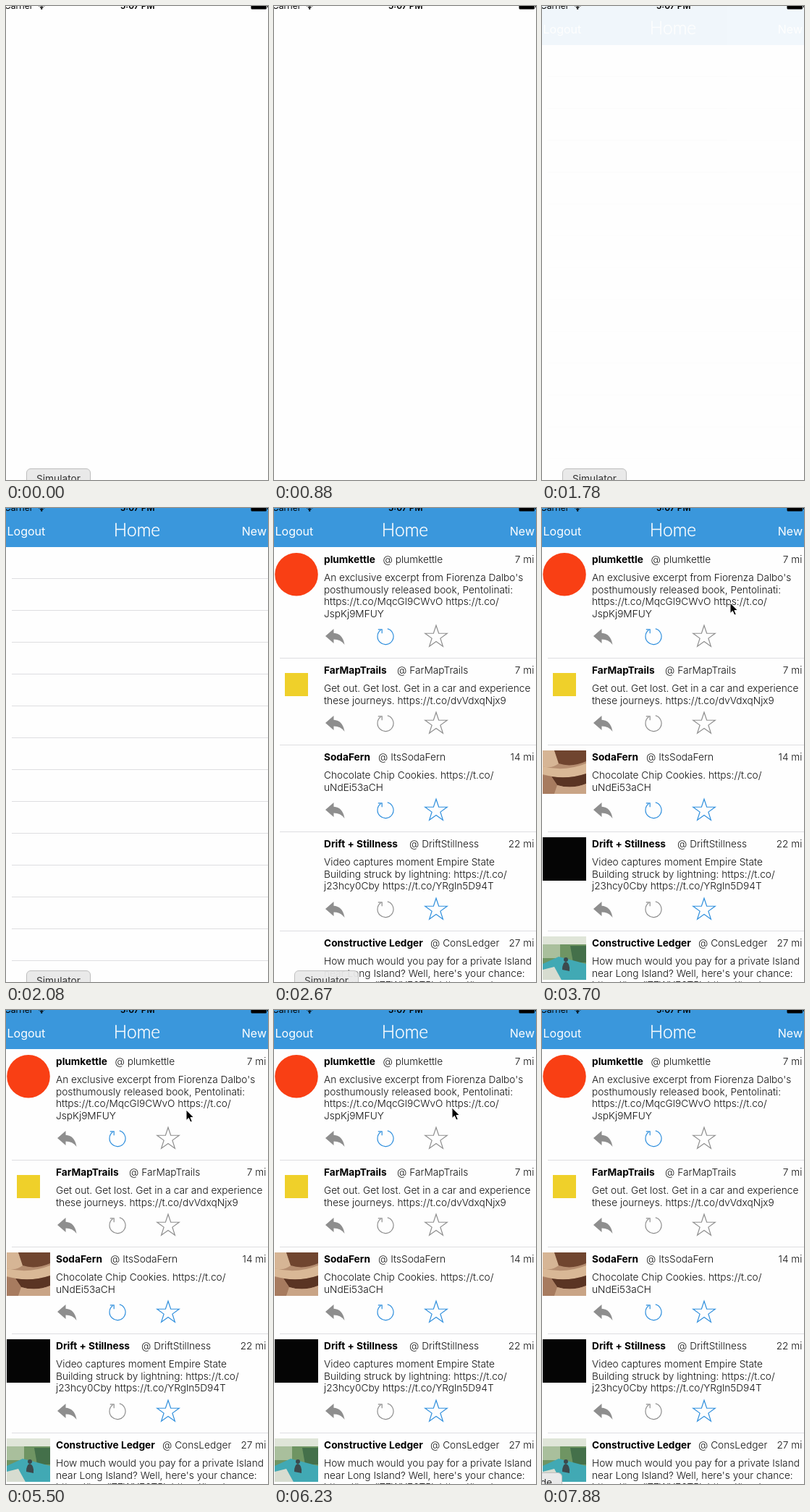
These frames come from a looping animation (362 px wide and 655 px high, 8000 ms). An HTML page:

```html
<!DOCTYPE html>
<html lang="en">
<head>
<meta charset="utf-8">
<title>Home feed</title>
<style>
html, body { margin: 0; width: 100%; height: 100%; overflow: hidden; background: #fefefe; }
#stage {
  position: relative; width: 362px; height: 655px; overflow: hidden; background: #fefefe;
  font: 300 13.7px/16.6px Inter, "Open Sans", sans-serif; color: #111; white-space: pre;
}
#stage div, #stage span, #stage b, #stage svg { position: absolute; }
#home, #feed { inset: 0; }
#home, #feed, .late, .tip, #cursor { animation: 8s step-end infinite; }

.nav { left: 0; top: 0; width: 362px; height: 54px; background: #3a97dc; color: #fff; }
.nav span { font-size: 16px; font-weight: 400; line-height: 20px; top: 22px; }
.nav .title {
  font: 300 24.5px/30px Lato, sans-serif; -webkit-text-stroke: .4px #fff;
  top: 15px; left: 0; width: 362px; text-align: center;
}
.line { left: 8px; right: 0; height: 1px; background: #dedee1; }

#feed { top: 54px !important; background: #fefefe; }
.row { left: 0; width: 362px; }
.row b, .row .at, .row .ago { top: 8.7px; }
.row b, .row .text { left: 69px; }
.row b { font-weight: 700; color: #000; }
.row .ago { right: 2.5px; }
.row .text { top: 34px; line-height: 16.55px; }
.row .pic { left: 1px; top: 8px; width: 60px; height: 59.5px; overflow: hidden; }
.row .icons { left: 60px; bottom: 10px; overflow: visible; }

.status { left: 0; top: 0; color: #000; font-size: 12px; font-weight: 400; }
.status span { top: -8.2px; }
.tip {
  top: 639px; height: 30px; padding: 0 13px; box-sizing: border-box; line-height: 26px;
  border: 1px solid #bdbdbd; border-radius: 6px; background: #e9e9e9; color: #333; font-weight: 400;
}
#sim { left: 28px; animation-name: sim; }
#code { right: 334px; animation-name: code; }
#cursor { left: -1px; top: -.5px; animation-name: point; }
#home { animation-name: home; }
#feed { animation-name: feed; }
.late { animation-name: late; }

@keyframes home { 0% { opacity: 0 } 22.25% { opacity: .07 } 24.125% { opacity: .55 } 26%, 100% { opacity: 1 } }
@keyframes feed { 0% { opacity: 0 } 33.375%, 100% { opacity: 1 } }
@keyframes late { 0% { opacity: 0 } 37.125%, 100% { opacity: 1 } }
@keyframes sim {
  0% { opacity: 1 } 3.625% { opacity: 0 } 16.625% { opacity: 1 }
  33.375% { opacity: .95 } 35.25%, 100% { opacity: 0 }
}
@keyframes code { 0% { opacity: 0 } 14.75% { opacity: 1 } 16.625% { opacity: 0 } 98.5%, 100% { opacity: 1 } }
@keyframes point {
  0% { transform: translate(70px, 670px) }
  1.75% { transform: translate(80px, 640px) }
  3.625% { transform: translate(100px, 560px) }
  5.5% { transform: translate(140px, 430px) }
  7.25% { transform: translate(185px, 270px) }
  9.125% { transform: translate(225px, 110px) }
  11% { transform: translate(240px, -40px) }
  35.25% { transform: translate(88px, 640px) }
  37.125% { transform: translate(110px, 585px) }
  38.875% { transform: translate(150px, 480px) }
  40.75% { transform: translate(195px, 350px) }
  42.625% { transform: translate(232px, 240px) }
  44.375% { transform: translate(255px, 165px) }
  46.25% { transform: translate(261px, 131px) }
  68.75% { transform: translate(250px, 138px) }
  70.625% { transform: translate(225px, 150px) }
  72.375% { transform: translate(197px, 156px) }
  74.25% { transform: translate(215px, 150px) }
  76% { transform: translate(236px, 141px) }
  77.875% { transform: translate(247px, 135px) }
  91% { transform: translate(207px, 160px) }
  92.875%, 100% { transform: translate(70px, 670px) }
}
</style>
</head>
<body>
<div id="stage">
  <div id="home">
    <div class="nav">
      <span style="left:1.5px">Logout</span>
      <span class="title">Home</span>
      <span style="right:2px">New</span>
    </div>
  </div>
  <div id="feed"></div>
  <div class="status">
    <span style="left:-2px">Carrier</span>
    <svg style="left:44px;top:0" width="11" height="6" fill="none" stroke="#000" stroke-width="1.5">
      <path d="M1 0Q5.2 -2.5 9.5 0M3 2Q5.2 .3 7.5 2"/><circle cx="5.2" cy="3.6" r=".5"/>
    </svg>
    <span style="left:158px;font-weight:600">5:07 PM</span>
    <svg style="left:338px;top:0" width="24" height="6">
      <rect x=".5" y="-6" width="21.5" height="10.5" rx="1.5" fill="#000"/>
      <rect x="23" y="-2" width="1.5" height="4"/>
    </svg>
  </div>
  <div class="tip" id="sim">Simulator</div>
  <div class="tip" id="code">Decode</div>
  <svg id="cursor" width="14" height="20" overflow="visible">
    <path d="M0 0V14.5L3.4 11.4L5.8 17L8.3 16L5.9 10.5H10.5Z" fill="#000" stroke="#fff"/>
  </svg>
</div>
<script>
const GRAY = '#8e8e8e', BLUE = '#2f8fdd';

const pics = {
  disc: '<circle cx="30" cy="29.8" r="29.8" fill="#f93f14"/>',
  square: '<rect x="14" y="13" width="32" height="32" fill="#efd02a"/>',
  cake: `<rect width="60" height="60" fill="#b58d70"/>
    <path d="M0 0H16L22 18Q12 26 0 22Z" fill="#d6b595"/>
    <path d="M16 0H60V15Q40 24 22 18Z" fill="#70452f"/>
    <path d="M0 22Q30 30 60 18V32Q30 42 0 33Z" fill="#d9b896"/>
    <path d="M12 36Q36 40 60 32V46Q40 54 20 48Z" fill="#5a3423"/>
    <path d="M0 34L12 36L20 48L16 60H0Z" fill="#a77b5f"/>
    <path d="M20 48Q40 54 60 46V60H16Z" fill="#c9a486"/>`,
  black: '<rect width="60" height="60" fill="#050505"/>',
  pool: `<rect width="60" height="64" fill="#6f9563"/>
    <rect width="60" height="11" fill="#dfe5d8"/>
    <path d="M0 11H24V30H0Z" fill="#a9bf9c"/>
    <path d="M38 13H60V36H42Z" fill="#44704a"/>
    <path d="M0 38L22 28L60 38V64H0Z" fill="#41a9b4"/>
    <path d="M0 46L16 42L28 64H0Z" fill="#d7dcd0"/>
    <path d="M27 46Q27 36 32 35Q38 37 37 48Z" fill="#3c4a4d"/>
    <circle cx="32" cy="32" r="3" fill="#3c4a4d"/>`
};

// top, height, name, handle, handle x, age, text, picture, repost and star on, arrives late
const rows = [
  [0, 153, 'plumkettle', 'plumkettle', 150.5, 7,
    "An exclusive excerpt from Fiorenza Dalbo's\nposthumously released book, Pentolinati:\nhttps://t.co/MqcGl9CWvO https://t.co/\nJspKj9MFUY", 'disc', 1, 0, 0],
  [153, 120, 'FarMapTrails', 'FarMapTrails', 170, 7,
    'Get out. Get lost. Get in a car and experience\nthese journeys. https://t.co/dvVdxqNjx9', 'square', 0, 0, 0],
  [273, 120, 'SodaFern', 'ItsSodaFern', 144, 14,
    'Chocolate Chip Cookies. https://t.co/\nuNdEi53aCH', 'cake', 1, 1, 1],
  [393, 137, 'Drift + Stillness', 'DriftStillness', 187, 22,
    'Video captures moment Empire State\nBuilding struck by lightning: https://t.co/\nj23hcy0Cby https://t.co/YRgln5D94T', 'black', 0, 1, 1],
  [530, 137, 'Constructive Ledger', 'ConsLedger', 216, 27,
    "How much would you pay for a private Island\nnear Long Island? Well, here's your chance:\nhttps://t.co/lZ7WYF6T5L https://t.co/", 'pool', 0, 0, 1]
];

const star = Array.from({ length: 10 }, (_, i) => {
  const r = i % 2 ? 6.2 : 16, a = i * Math.PI / 5;
  return `${(164 + r * Math.sin(a)).toFixed(2)},${(21.2 - r * Math.cos(a)).toFixed(2)}`;
}).join(' ');

const icons = (repost, fav) => `<svg class="icons" width="190" height="40" fill="none" stroke-width="1.2">
  <path d="M11 20L22.5 10V15.8Q35 16.5 37.5 32Q32 24.6 22.5 24.6V30Z" fill="${GRAY}"/>
  <g stroke="${repost ? BLUE : GRAY}">
    <path d="M96.8 9.9A11 11 0 1 1 87.6 11.6"/><path d="M83.8 10.8H89.2V16.2"/>
  </g>
  <polygon points="${star}" stroke="${fav ? BLUE : GRAY}"/>
</svg>`;

const line = y => `<div class="line" style="top:${y}px"></div>`;

document.getElementById('home').innerHTML +=
  Array.from({ length: 13 }, (_, i) => line(97 + 44 * i)).join('');

document.getElementById('feed').innerHTML = rows.map(
  ([top, h, name, handle, x, age, text, pic, repost, fav, late]) =>
    `<div class="row" style="top:${top}px;height:${h}px">` +
    `<svg class="pic${late ? ' late' : ''}">${pics[pic]}</svg>` +
    `<b>${name}</b><span class="at" style="left:${x}px">@ ${handle}</span>` +
    `<span class="ago">${age} mi</span><span class="text">${text}</span>` +
    icons(repost, fav) + line(h) + '</div>').join('');
</script>
</body>
</html>
```
